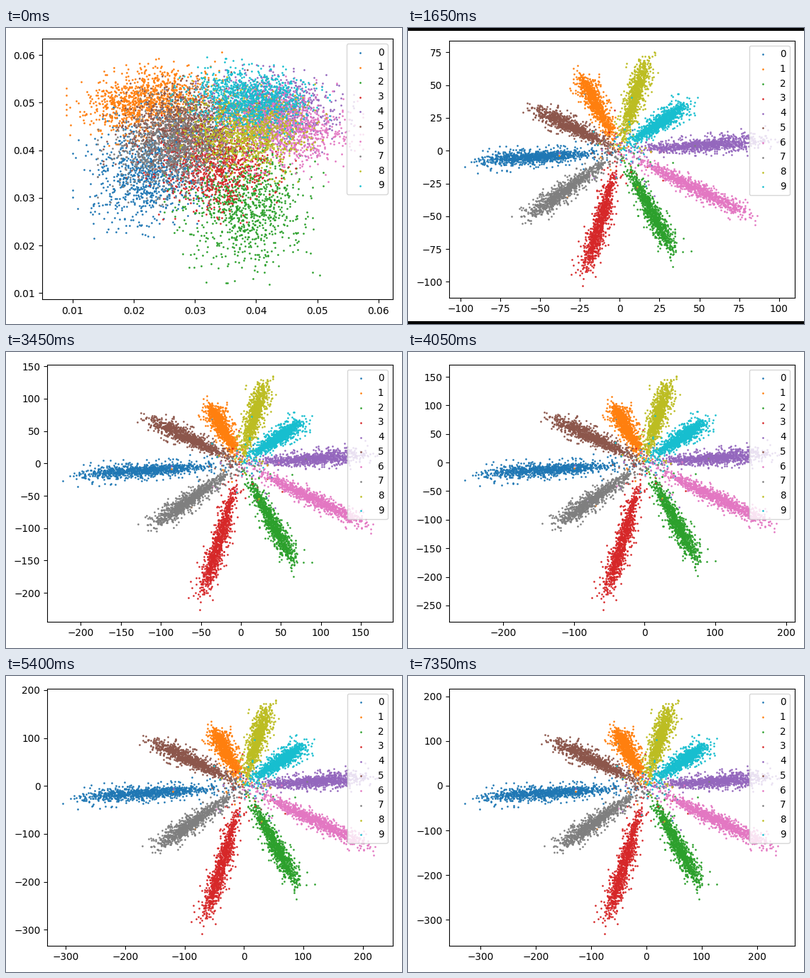
Write a matplotlib script that moves like this. It is 558 px wide and 418 px high and loops after 7.5 s.

```python
import numpy as np
import matplotlib.pyplot as plt
from matplotlib.animation import FuncAnimation
from matplotlib.patches import Rectangle

W, H, DPI = 558, 418, 100
FRAMES, STEP = 50, 150
N, CLASSES = 1000, 10
rng = np.random.default_rng(7)

fig = plt.figure(figsize=((W + 1e-6) / DPI, (H + 1e-6) / DPI), dpi=DPI,
                 facecolor="white")
ax = fig.add_axes([0.1, 0.1, 0.8, 0.8])
bars = [Rectangle((0, y), 1, 0, transform=fig.transFigure, color="black", lw=0)
        for y in (0, 1)]
for bar in bars:
    fig.add_artist(bar)

# Cloud centres before training, in thousandths
HOMES = [(23, 36), (22, 50.5), (38, 29), (33.5, 38), (43, 48.5),
         (28, 45.5), (44.5, 45), (27, 41), (38.5, 44.5), (39, 51)]
CLOUD_LIM = (0.00502, 0.0623, 0.0087, 0.0634)

# Rays are spread evenly, counter-clockwise in this class order
ORDER = [4, 9, 8, 1, 5, 0, 7, 3, 2, 6]
ANGLES = np.radians(5 + 36 * np.argsort(ORDER))
DIRS = np.column_stack([np.cos(ANGLES), np.sin(ANGLES)])
NORMALS = np.column_stack([-DIRS[:, 1], DIRS[:, 0]])
EARLY_TIPS = np.array([273, 196, 262, 294, 279, 191, 284, 234, 217, 177])
LATE_TIPS = np.array([330, 156, 270, 340, 240, 215, 280, 227, 199, 165])


def make_cloud(mx, my):
    """Clouds get flatter towards the top and tilt up on the left."""
    a, b = np.clip(rng.normal(size=(2, N)), -2.7, 2.7)
    x = mx + 4.8 * a
    y = my + (4.2 - 0.15 * (my - 43)) * b + 0.07 * (35 - mx) * a
    return np.column_stack([x, y]) / 1000


def make_ray(k):
    """Return source class, radial position (0 to 1) and sideways offset."""
    t = rng.beta(4.3, 4, N)
    t /= t.max()
    side = 6 * np.clip(rng.standard_t(6, N), -4, 4) * (0.65 + 0.7 * t)
    stray = rng.random(N) < 0.025
    t = np.where(stray, rng.uniform(0, 0.3, N), t)
    side = np.where(stray, side * 2, side)
    swapped = rng.random(N) < 0.01
    src = np.where(swapped, rng.integers(0, CLASSES, N), k)
    t = np.where(swapped, t * rng.uniform(0.1, 0.8, N), t)
    return src, t, side


clouds = [make_cloud(*home) for home in HOMES]
rays = [make_ray(k) for k in range(CLASSES)]


def star(i):
    """All rays at epoch i: they grow, settle in length and tighten."""
    grow = np.sin(np.pi / 2 * min(1, i / 47))
    young = min(1, np.exp((11 - i) / 6))
    loose = 1 + 1.2 * max(0, (11 - i) / 10) ** 2
    tips = LATE_TIPS + (EARLY_TIPS - LATE_TIPS) * young
    return [grow * (DIRS[src] * (tips[src] * t)[:, None]
                    + NORMALS[src] * (side * loose)[:, None])
            for src, t, side in rays]


def label_width(text):
    return sum({"\u2212": 11.6, ".": 4.4}.get(ch, 8.84) for ch in text)


def page_scale():
    """Shrink the page when the y labels grow wider."""
    lo, hi = ax.get_ylim()
    ticks = ax.yaxis.get_major_locator()()
    labels = ax.yaxis.get_major_formatter().format_ticks(ticks)
    widest = max(label_width(s) for v, s in zip(ticks, labels) if lo <= v <= hi)
    return min(1, 1 - 0.002 * (widest - 30.9))


def place_axes(s):
    w, h = 494 * s, 368 * s
    ax.set_position([(544.8 - w) / W, (H - 199.2 - h / 2) / H, w / W, h / H])


def draw(i):
    ax.clear()
    place_axes(1)
    points = star(i) if i else clouds
    dots = [ax.scatter(*p.T, c=f"C{k}", lw=0, label=str(k))
            for k, p in enumerate(points)]
    if i == 0:
        ax.set(xlim=CLOUD_LIM[:2], ylim=CLOUD_LIM[2:])

    s = page_scale()
    place_axes(s)
    for dot in dots:
        dot.set_sizes([3.8 * s * s])
    ax.tick_params(labelsize=10 * s, length=3.5 * s, width=0.8 * s, pad=3.5 * s)
    for spine in ax.spines.values():
        spine.set_linewidth(0.8 * s)
    ax.legend(loc="upper right", fontsize=9.9 * s)

    band = 300 * (1 - s) / H if i < 14 else 0
    for bar, y in zip(bars, (0, 1 - band)):
        bar.set_y(y)
        bar.set_height(band)
        bar.set_visible(band > 0)
    return []


anim = FuncAnimation(fig, draw, frames=FRAMES, interval=STEP, repeat=True,
                     repeat_delay=0, blit=False)
plt.show()
```
